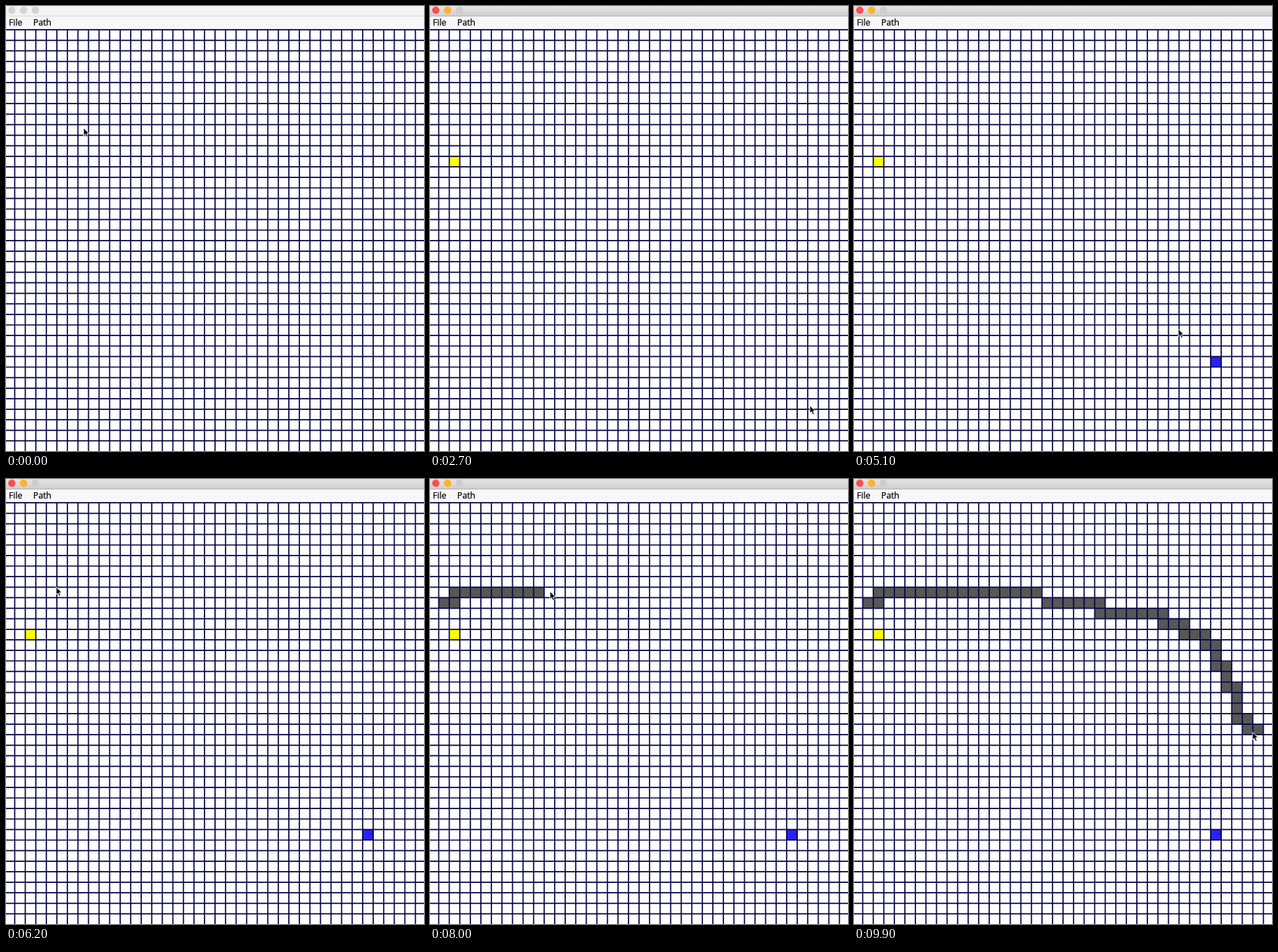
Recreate the animation shown at these times as an HTML page. Size 600 px wide and 639 px high, loop 10000 ms.

```html
<!DOCTYPE html>
<html lang="en">
<head>
<meta charset="utf-8">
<title>Path grid</title>
<style>
  html, body { margin: 0; width: 100%; height: 100%; overflow: hidden; background: #fff; }
  svg { display: block; width: 600px; height: 639px; }
  text { font: 12.3px "Open Sans", "Noto Sans", sans-serif; stroke: #000; stroke-width: .25; }
</style>
</head>
<body>
<svg viewBox="0 0 600 639">
  <defs>
    <linearGradient id="bar" x2="0" y2="1">
      <stop offset="0" stop-color="#e5e3e5"/>
      <stop offset="1" stop-color="#cfcdcf"/>
    </linearGradient>
  </defs>
  <rect width="600" height="639" fill="#fff"/>
  <rect id="title" width="600" height="14.5"/>
  <rect id="edge" y="14" width="600" height="1"/>
  <rect y="15" width="600" height="19" fill="#f8f6f8"/>
  <g id="lights"></g>
  <text x="4" y="28">File</text>
  <text x="39" y="28">Path</text>
  <g id="cells"></g>
  <path id="grid" fill="none" stroke="#020244" stroke-width="1.7"/>
  <path id="cursor" d="M0 0V11.2L2.5 8.9L4.4 13.2L6.4 12.3L4.6 8.2H8Z"
        fill="#000" stroke="#fff" stroke-width=".9" stroke-linejoin="round"/>
</svg>
<script>
const LOOP = 10000, TICK = 100, PITCH = 15.135, LEFT = 12.5, TOP = 34.2;
const ACTIVATE = 1400, START = 1800, GOAL = 4600, PEN_DOWN = 7000, PEN_LAG = 50;
const $ = id => document.getElementById(id);

// pointer stops: time, column, row; eased before the pen goes down, linear after
const stops = [
  [200, 6.53, 9.3], [1400, 1.62, 12.21], [1700, 1.42, 12.21], [2800, 36, 36.2],
  [3900, 33.86, 30.38], [4300, 33.4, 31.1], [4800, 33.4, 31.1], [6200, 3.93, 7.98],
  [6500, 3.93, 7.98], [PEN_DOWN, 0.4, 9.1], [7200, 1.6, 9], [7800, 9.3, 8.45],
  [7900, 9.3, 8.45], [8000, 10.55, 8.4], [8240, 17, 9], [8640, 28.6, 11],
  [8800, 32.2, 12.75], [9000, 34.2, 15.75], [9100, 34.2, 15.75], [9600, 36, 20.5],
  [9800, 37.2, 21.8], [9900, 36.97, 21.75]
];

const smooth = k => k * k * (3 - 2 * k);

function pointerAt(t) {
  const next = stops.findIndex(stop => stop[0] > t);
  if (next < 1) return (next ? stops[stops.length - 1] : stops[0]).slice(1);
  const [t0, c0, r0] = stops[next - 1], [t1, c1, r1] = stops[next];
  const k = (t - t0) / (t1 - t0), e = t < PEN_DOWN ? smooth(k) : k;
  return [c0 + (c1 - c0) * e, r0 + (r1 - r0) * e];
}

function addShape(parent, tag, attrs) {
  const node = document.createElementNS("http://www.w3.org/2000/svg", tag);
  for (const name in attrs) node.setAttribute(name, attrs[name]);
  return parent.appendChild(node);
}

const cells = [];
function addCell(col, row, fill, time) {
  const node = addShape($("cells"), "rect", {
    x: LEFT + col * PITCH, y: TOP + row * PITCH, width: PITCH, height: PITCH, fill
  });
  cells.push({ node, time });
}

addCell(1, 12, "#ffff00", START);
addCell(33, 31, "#2a20f5", GOAL);

// every cell the pen passes becomes a wall
const visited = new Set();
for (let t = PEN_DOWN; t < LOOP; t++) {
  const [col, row] = pointerAt(t).map(Math.floor), key = `${col},${row}`;
  if (visited.has(key)) continue;
  visited.add(key);
  addCell(col, row, "#575757", t + PEN_LAG);
}

let lines = "";
for (let x = LEFT; x < 600; x += PITCH) lines += `M${x} ${TOP}V639`;
for (let y = TOP; y < 639; y += PITCH) lines += `M0 ${y}H600`;
$("grid").setAttribute("d", lines);

const lights = ["#fc4e4b", "#fdb324", "#cfcccf"].map((color, i) => ({
  color, node: addShape($("lights"), "circle", { cx: 8.3 + i * 16.9, cy: 6, r: 5.2 })
}));

function draw(now) {
  const t = Math.floor((now % LOOP) / TICK) * TICK;
  const active = t >= ACTIVATE;
  const [col, row] = pointerAt(t);
  $("title").setAttribute("fill", active ? "url(#bar)" : "#f4f1f4");
  $("edge").setAttribute("fill", active ? "#b5b3b5" : "#d9d6d9");
  for (const { node, color } of lights) node.setAttribute("fill", active ? color : "#d6d3d6");
  for (const { node, time } of cells) node.setAttribute("visibility", t >= time ? "visible" : "hidden");
  $("cursor").setAttribute("transform", `translate(${LEFT + col * PITCH} ${TOP + row * PITCH})`);
}

const begin = performance.now();
function frame() {
  draw(performance.now() - begin);
  requestAnimationFrame(frame);
}
frame();
</script>
</body>
</html>
```
